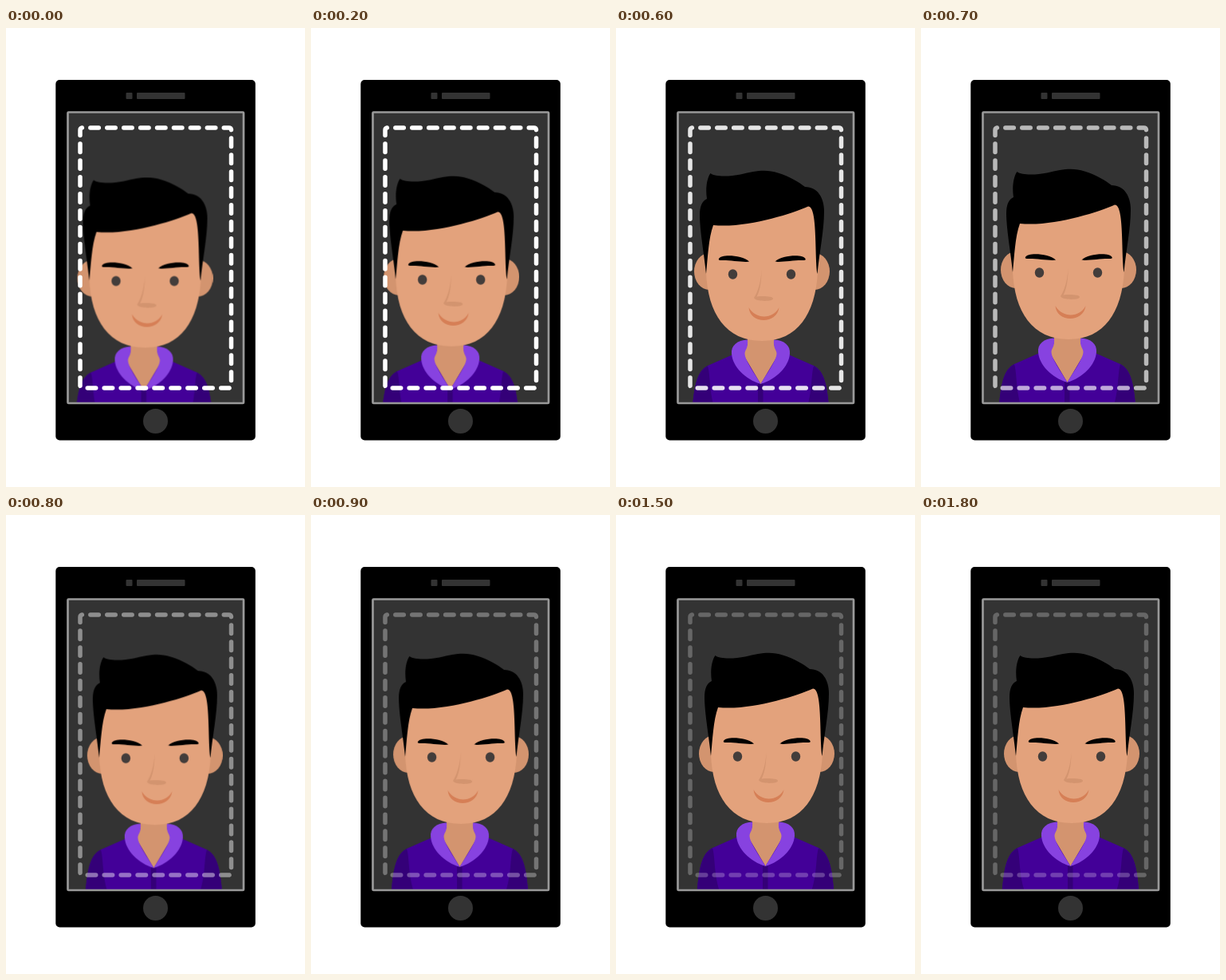
Animation of 375x575 px, one loop 2 s. Source, as an HTML page without scripts:

```html
<!DOCTYPE html>
<html lang="en">
<head>
<meta charset="utf-8">
<title>Portrait framing</title>
<style>
  html, body { margin: 0; width: 100%; height: 100%; overflow: hidden; background: #fff; }
  svg { display: block; width: 375px; height: 575px; }

  /* ten pictures per second, hence the held steps */
  .person { animation: settle 2s step-end infinite; }
  .guide { animation: dim 2s step-end infinite; }

  @keyframes settle {
    0% { transform: translate(-14.5px, 14.5px); }
    5% { transform: translate(-13.9px, 13.9px); }
    10% { transform: translate(-12.8px, 12.8px); }
    15% { transform: translate(-11.4px, 11.4px); }
    20% { transform: translate(-9.7px, 9.7px); }
    25% { transform: translate(-7.9px, 7.9px); }
    30% { transform: translate(-6px, 6px); }
    35% { transform: translate(-4px, 4px); }
    40% { transform: translate(-2.2px, 2.2px); }
    45% { transform: translate(-.9px, .9px); }
    50% { transform: translate(-.2px, .2px); }
    55%, 100% { transform: none; }
  }
  @keyframes dim {
    0% { opacity: 1; }
    25% { opacity: .98; }
    30% { opacity: .88; }
    35% { opacity: .66; }
    40% { opacity: .45; }
    45% { opacity: .32; }
    50% { opacity: .27; }
    55%, 100% { opacity: .25; }
  }

  .dark { fill: #333; }
  .skin { fill: #e3a27c; }
  .shade { fill: #d3946f; }
  .shirt { fill: #430098; }
  .sleeve { fill: #340078; }
  .collar { fill: #8742e0; }
  .eye { fill: #433d3b; }
  .mouth { fill: #d67f56; }
</style>
</head>
<body>
<svg viewBox="0 0 375 575">
  <defs>
    <clipPath id="screen"><rect x="77.5" y="105.5" width="220.5" height="364.5"/></clipPath>
    <path id="sleeve" d="M101.5 475C104 440 108 424 121 417C125 432 122 448 131 475Z"/>
    <path id="collar" d="M171 384.500C158 385 150 392 151 402C152 418 168 434 187.500 440C180 427 168 411 167.500 402C167.500 397 172 396 171 384.500Z"/>
    <path id="brow" d="M135 283C137 277 164 278 173 286.500C168 288 150 285 141 285C136 285 134 285 135 283Z"/>
  </defs>

  <!-- phone -->
  <rect x="62.300" y="65" width="250.500" height="451.500" rx="5"/>
  <g class="dark">
    <rect x="150.500" y="81" width="8" height="8" rx="1"/>
    <rect x="164" y="81" width="60.500" height="8" rx="1"/>
    <circle cx="187.500" cy="492.500" r="15.500"/>
    <rect x="77.500" y="105.500" width="220.500" height="364.500"/>
  </g>

  <g clip-path="url(#screen)">
    <g class="person">
      <!-- body -->
      <path class="shirt" d="M101.500 475C104 440 108 424 121 417L155 402H220L254 417C267 424 271 440 273.500 475Z"/>
      <g class="sleeve">
        <use href="#sleeve"/>
        <use href="#sleeve" transform="matrix(-1 0 0 1 375 0)"/>
        <rect x="184" y="438" width="6.500" height="40"/>
      </g>
      <path class="shade" d="M171 370H204V390L210 402L187.500 440L165 402L171 390Z"/>
      <g class="collar">
        <use href="#collar"/>
        <use href="#collar" transform="matrix(-1 0 0 1 375 0)"/>
      </g>

      <!-- head -->
      <g class="shade">
        <ellipse cx="123" cy="299" rx="19" ry="23"/>
        <ellipse cx="255" cy="299" rx="19" ry="23"/>
      </g>
      <path class="skin" d="M119 300C121 352 144 386 189 386C234 386 256 352 259 300L258 210H120Z"/>
      <path d="M119 302C117 280 111 248 111 228C111 217 114 211 120 208C118 195 120 182 124.500 176C131 181 149 180 162 177.500C182 172.500 195 171 209 175.500C224 180 235 187 243 193C259 193 267 207 267 224C267 247 261 276 258.500 302C255 278 259 217 247 217.500C225 227 170 245 128 241C122 257 121 283 119 302Z"/>
      <use href="#brow"/>
      <use href="#brow" transform="matrix(-1 0 0 1 378.500 0)"/>
      <g class="eye">
        <ellipse cx="152.500" cy="302.500" rx="5.700" ry="6.200"/>
        <ellipse cx="225.500" cy="302.500" rx="5.700" ry="6.200"/>
      </g>
      <path class="shade" d="M188.500 297C188 311 184 325 179 332C181 337 203 337 203 333C203 330 190 329.500 182.500 330.500C187 322 188.500 310 188.500 297Z"/>
      <path class="mouth" d="M172.500 344C174 365.300 208 365.300 210.500 344C203 359.300 181 359.300 172.500 344Z"/>
    </g>
  </g>

  <rect x="77.500" y="105.500" width="220.500" height="364.500" rx="1" fill="none" stroke="#999" stroke-width="2.700"/>
  <rect class="guide" x="93" y="125" width="189.500" height="326" rx="3" fill="none" stroke="#fff" stroke-width="5.500"
    stroke-linecap="round" pathLength="490" stroke-dasharray="5 5" stroke-dashoffset="-4.700"/>
</svg>
</body>
</html>
```
